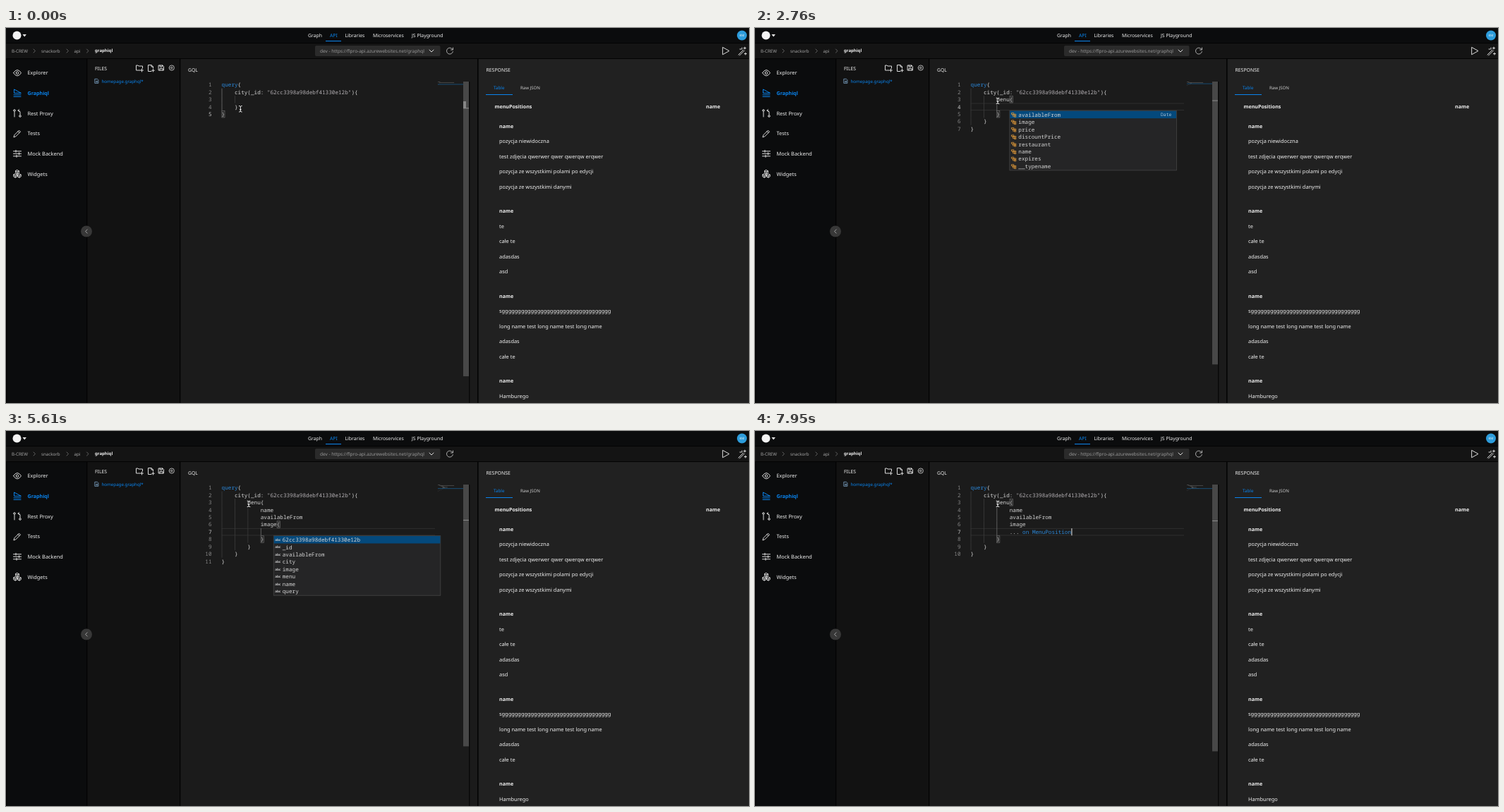
An HTML page for the animation above (8 s loop, 1053 px wide and 532 px high).

```html
<!DOCTYPE html>
<html lang="en">
<head>
<meta charset="utf-8">
<style>
  html, body { margin: 0; width: 100%; height: 100%; overflow: hidden; background: #0b0c0d; }
  svg { display: block; width: 1053px; height: 532px; }
  text { font-family: "Noto Sans", sans-serif; fill: #f0f0f0; text-rendering: geometricPrecision; white-space: pre; }
  .code { font-family: "Noto Sans Mono", monospace; font-size: 7.675px; fill: #d4d4d4; }
  .icon { fill: none; stroke: #dcdcdc; stroke-width: 1; stroke-linecap: round; stroke-linejoin: round; }
</style>
</head>
<body>
<svg viewBox="0 0 1053 532"><g id="app"></g><g id="editor"></g></svg>
<script>
const LOOP = 8000, BLINK = 150;
const LEFT = 305.6, TOP = 75.2, CHAR = 4.605, LINE = 10.45, VIEW = 456.4;
const BLUE = '#0a84ee', KEYWORD = '#2b87d8';

const rect = (x, y, w, h, fill, extra = '') =>
  `<rect x="${x}" y="${y}" width="${w}" height="${h}" fill="${fill}" ${extra}/>`;
const label = (x, y, str, size = 7.4, style = '') =>
  `<text x="${x}" y="${y}" dy=".36em" style="font-size:${size}px;${style}">${str}</text>`;
const icon = (x, y, d, style = '') =>
  `<path class="icon" transform="translate(${x} ${y})" d="${d}" style="${style}"/>`;
const code = (x, y, str, style = '') =>
  `<text class="code" x="${x}" y="${y}" dy=".36em" style="${style}">${str}</text>`;

// ---------- static interface ----------
function drawApp() {
  const bold = 'font-weight:700;', medium = 'font-weight:500;', blue = `fill:${BLUE};`;
  let s = rect(0, 0, 1053, 532, '#0b0c0d') + rect(0, 22, 1053, 21, '#141414') +
    rect(115, 44, 131, 488, '#121212') + rect(247, 44, 421, 488, '#1b1b1b') +
    rect(669.5, 44, 383.5, 488, '#212121') + rect(0, 21, 1053, 1, '#030303') + rect(0, 43, 1053, 1, '#030303');
  for (const x of [0, 114, 246, 668]) s += rect(x, 44, 1.3, 488, '#030303');

  s += '<circle cx="15.5" cy="10.5" r="6" fill="#f4f4f4"/><path d="M23.5 9h5.4l-2.7 3.4z" fill="#eee"/>';
  [['Graph', 428], ['API', 459], ['Libraries', 480.5], ['Microservices', 520], ['JS Playground', 575]]
    .forEach(([name, x], i) => s += label(x, 10.7, name, 6.85, medium + (i === 1 ? blue : '')));
  s += rect(453, 18, 22, 1, BLUE);
  s += '<circle cx="1043" cy="10.5" r="7" fill="#2d9cdb"/>' + label(1043, 10.7, 'KM', 4.5, 'text-anchor:middle');

  const crumb = 'fill:#a5a5a5;';
  s += label(8, 32.3, 'B-CREW', 6.2, crumb) + label(50, 32.3, 'snackorb', 6.2, crumb) +
    label(96.5, 32.3, 'api', 6.2, crumb) + label(126, 32.3, 'graphiql', 6, bold);
  for (const x of [40, 87, 115.5]) s += icon(x, 32.5, 'M-1-2.5L1.5 0-1 2.5', 'stroke:#777;stroke-width:.8');
  s += rect(438, 25, 177.5, 15, '#2b2b2b', 'rx="2"') +
    label(445, 32.7, 'dev - https://flpro-api.azurewebsites.net/graphql', 6.5, 'fill:#9a9a9a') +
    icon(603, 32.5, 'M-3-1.5L0 1.5 3-1.5') +
    icon(629, 32.5, 'M4-2A4.5 4.5 0 1 0 4.4 1M4.5-4.5V-1.5H1.5', 'stroke:#aaa') +
    icon(1020, 32.5, 'M-4-5L5 0-4 5z') +
    icon(1043, 33, 'M-5 5L2-2M-3.5 6L3.5-1M0-5V-3M-3-3H-1M4-6V-3M2.5-4.5H5.5M5 2V5M3.5 3.5H6.5');

  const cube = 'm0-2.6l2.4 1.3v2.6l-2.4 1.3-2.4-1.3v-2.6zm-2.4 1.3l2.4 1.3 2.4-1.3m-2.4 1.3v2.6';
  const items = [
    ['Explorer', 'M-5.5 0Q0-8.5 5.5 0Q0 8.5-5.5 0M-1.8 0a1.8 1.8 0 1 0 3.6 0a1.8 1.8 0 1 0-3.6 0'],
    ['Graphiql', 'M-4.5-5V0L5 0zM-5 2.5H5M-5 5H5'],
    ['Rest Proxy', 'M-4-2V5M4 2V-2Q4-4 1-4M2.5-5.5L1-4 2.5-2.5M-5.3-4a1.3 1.3 0 1 0 2.6 0a1.3 1.3 0 1 0-2.6 0M2.7 4a1.3 1.3 0 1 0 2.6 0a1.3 1.3 0 1 0-2.6 0'],
    ['Tests', 'M-5 5L-4 2 2.5-4.5 4.5-2.5-2 4zM1-3L3-1'],
    ['Mock Backend', 'M-5.5-3.5H5.5M-5.5 0H5.5M-5.5 3.5H5.5M-2-5V-2M2.5-1.5V1.5M-1 2V5'],
    ['Widgets', `M0-2.8${cube}M-2.8 2.6${cube}M2.8 2.6${cube}`],
  ];
  items.forEach(([name, d], i) => {
    const y = 63.7 + 28.65 * i, on = i === 1;
    s += icon(16, y, d, on ? `stroke:${BLUE}` : '') + label(30.5, y, name, on ? 7.1 : 7.4, on ? bold + blue : '');
  });
  s += '<circle cx="114" cy="288.5" r="8" fill="#383838"/>' + icon(114, 288.5, 'M1.2-2.6L-1.4 0 1.2 2.6', 'stroke:#bbb;stroke-width:.8');

  s += label(126, 57.2, 'FILES', 6.9, medium) + label(258, 59.5, 'GQL', 6.8, medium) + label(680.5, 59.5, 'RESPONSE', 6.9, medium);
  s += icon(189, 57, 'M1 3H-4.5V-4H-2L-1-3H4.5V0M3.5 1V5M1.5 3H5.5') +
    icon(205, 57, 'M1 4.5H-3.5V-4.5H1L3.5-2V0M1-4.5V-2H3.5M3.5 1.5V5M1.7 3.2H5.3') +
    icon(220, 56.5, 'M-3.5-3.5H2L3.5-2V3.5H-3.5zM-1.8-3.5V-1.5H1.5V-3.5M-2 3.5V.8H2V3.5') +
    icon(234.8, 56.5, 'M-3.6 0a3.6 3.6 0 1 0 7.2 0a3.6 3.6 0 1 0-7.2 0M-1.3 0a1.3 1.3 0 1 0 2.6 0a1.3 1.3 0 1 0-2.6 0', 'stroke-width:.8');
  s += icon(128.5, 75.3, 'M-2.3-3H1L2.4-1.6V3H-2.3zM-1 0H1.2M-1 1.5H1.2', 'stroke:#7fa8cc;stroke-width:.8') +
    label(135.5, 75.3, 'homepage.graphql*', 6.2, blue);

  s += label(691, 84.7, 'Table', 6.25, blue) + label(729, 84.7, 'Raw JSON', 6.1, 'fill:#ccc') + rect(680, 94, 38, 1, BLUE);
  s += label(692.5, 111.3, 'menuPositions', 7.1, bold) + label(992, 111.3, 'name', 7.1, bold);
  const groups = [
    ['pozycja niewidoczna', 'test zdjęcia qwerwer qwer qwerqw erqwer', 'pozycja ze wszystkimi polami po edycji', 'pozycja ze wszystkimi danymi'],
    ['te', 'całe te', 'adasdas', 'asd'],
    ['s' + 'g'.repeat(34), 'long name test long name test long name', 'adasdas', 'całe te'],
    ['Hamburego'],
  ];
  groups.forEach((names, g) => {
    const y = 139.3 + 120.45 * g;
    s += label(699, y, 'name', 7.1, bold);
    names.forEach((name, i) => s += label(699, y + 21.45 * (i + 1), name, 7.42));
  });
  return s;
}

// ---------- editing session ----------
const IN = n => ' '.repeat(4 * n);
const doc = body => `query{\n${IN(1)}city(_id: "62cc3398a98debf41330e12b"){\n${body}\n${IN(1)}}\n}`;
const city = str => doc(IN(2) + str);
const menu = (...lines) => doc([IN(2) + 'menu{', ...lines.map(l => IN(3) + l), IN(2) + '}'].join('\n'));
const dish = (...lines) => menu('name', 'availableFrom', ...lines);

const cityFields = ['_id', 'name', 'menu', 'restaurants', '__typename'];
const fields = ['availableFrom', 'image', 'price', 'discountPrice', 'restaurant', 'name', 'expires', '__typename'];
const words = ['62cc3398a98debf41330e12b', '_id', 'availableFrom', 'city', 'image', 'menu', 'name', 'query'];
const types = ['MenuItem', 'MenuPosition', 'Named', 'Priced'];
const details = { availableFrom: 'Date', _id: 'String', name: 'String', image: 'String', menu: 'Menu' };

// time, text with | as the caret, suggestions, selected row
const steps = [
  [0, city('')], [450, city('|')], [570, city('|'), cityFields, 0],
  [960, city('|'), cityFields, 1], [1200, city('|'), cityFields, 2],
  [1830, city('menu|')], [2040, city('menu{|}')], [2220, menu('|')],
  [2670, menu('|'), fields, 0], [2790, menu('n|'), ['name', '__typename', 'restaurant'], 0],
  [2880, menu('na|'), ['name', '__typename'], 0], [3030, menu('name|')],
  [3240, menu('name', '|')], [3330, menu('name', '|'), fields, 0], [3720, menu('name', 'availableFrom|')],
  [3990, menu('name', 'availableFrom{|}')], [4200, menu('name', 'availableFrom{', IN(1) + '|', '}')],
  [4440, menu('name', 'availableFrom{', '|')], [4590, dish('|')],
  [4830, dish('|'), fields, 0], [5040, dish('|'), fields, 1],
  [5130, dish('image|')], [5280, dish('image{|}')],
  [5430, dish('image{', IN(1) + '|', '}'), words, 0], [5760, dish('image{', IN(1) + '|', '}')],
  [5910, dish('image{', '|')], [6000, dish('image|')],
  [6120, dish('image', '|')], [6270, dish('image', '|'), fields, 0],
  [6510, dish('image', '.|')], [6600, dish('image', '..|')], [6780, dish('image', '...|')],
  [6840, dish('image', '... |')], [6900, dish('image', '... o|')], [6960, dish('image', '... on|')],
  [7200, dish('image', '... on |')], [7380, dish('image', '... on |'), types, 0],
  [7680, dish('image', '... on |'), types, 1], [7950, dish('image', '... on MenuPosition|')],
].map(([time, text, list, selected]) => ({ time, text, list, selected }));
steps.forEach((s, i) => s.edited = i && steps[i - 1].text === s.text ? steps[i - 1].edited : s.time);

const colX = col => LEFT + CHAR * col;
const lineY = row => TOP + LINE * row;

// The innermost pair of braces around the caret
function enclosingPair(text, caret) {
  const open = [];
  for (let i = 0; i < text.length; i++) {
    if (text[i] === '{') open.push(i);
    if (text[i] === '}') {
      const start = open.pop();
      if (start < caret && caret <= i + 1) return [start, i];
    }
  }
  return [];
}

const colorize = line => line.replace(/"[^"]*"|\bquery\b|\bon( MenuPosition)?\b/g, token =>
  `<tspan fill="${token[0] === '"' ? '#b2aeb2' : KEYWORD}">${token}</tspan>`);

function drawPopup({ list, selected }, x, y) {
  const h = list.length * LINE;
  let s = rect(x, y + .3, 236.5, h + 1, '#252526', 'stroke="#454545" stroke-width=".8"');
  s += rect(x + .4, y + .7 + selected * LINE, 235.7, LINE, '#04497c');
  list.forEach((item, i) => {
    const cy = y + .8 + LINE * (i + .5);
    s += list === words
      ? label(x + 2, cy, 'abc', 4.6, 'font-weight:700;fill:#ccc')
      : icon(x + 6, cy, 'M-3-2.5H0V-.5H-3zM-1.5-.5V2.2H1M1-.8H3V.8H1zM1 1.6H3V3.2H1zM-1.5 0H1', 'stroke:#e09a3a;stroke-width:.8');
    s += code(x + 12.5, cy, item);
    if (i === selected && details[item])
      s += code(x + 229.5, cy, details[item], 'font-size:6.4px;text-anchor:end;fill:#a9c3d8');
  });
  return s;
}

function drawEditor(t) {
  const step = steps.findLast(s => s.time <= t);
  const mark = step.text.indexOf('|'), focused = mark >= 0;
  const text = step.text.replace('|', ''), caret = focused ? mark : text.length;
  const lines = text.split('\n');
  const place = i => {
    const before = text.slice(0, i).split('\n');
    return { row: before.length - 1, col: before.at(-1).length };
  };
  const { row, col } = place(caret);
  const pair = enclosingPair(text, caret).map(place);
  let s = '';

  if (focused) for (const y of [lineY(row), lineY(row + 1) - .9]) s += rect(LEFT, y, 302.5, .9, '#303030');

  lines.forEach((line, i) => {
    const indent = line.match(/^ */)[0].length;
    for (let c = 0; c < indent; c += 4) {
      const active = pair.length && i > pair[0].row && i < pair[1].row && c === lines[pair[0].row].search(/\S/);
      s += rect(colX(c), lineY(i), .8, LINE, active ? '#707070' : '#3c3c3c');
    }
    const y = lineY(i + .5);
    s += code(291.5, y, i + 1, `text-anchor:end;fill:${i === row ? '#c6c6c6' : '#858585'}`);
    s += code(LEFT, y, colorize(line));
    // minimap
    s += rect(612 + .55 * indent, 76.1 + .87 * i, .55 * line.trim().length, .6, '#8a8a8a', 'opacity=".65"');
  });
  for (const p of focused ? pair : pair.slice(1))
    s += rect(colX(p.col) + .2, lineY(p.row) + .4, CHAR - .4, LINE - .9, '#88888818', 'stroke="#777" stroke-width=".6"');
  s += rect(612, 76 + .87 * row, 36, .9, '#17517c');

  // scrollbar and caret position in the ruler
  const scale = VIEW / (VIEW + (lines.length - 1) * LINE);
  const rulerY = 76 + row * LINE * scale;
  s += rect(656, 76, 1.4, 456, '#080808') + rect(648, 76, 8, VIEW * scale, '#484848');
  if (!focused) s += rect(648, 104, 4, 10, '#858585');
  s += rect(648, rulerY - 1, 8, 1, '#8c8c8c');

  if (focused && Math.floor((t - step.edited) / BLINK) % 2 === 0)
    s += rect(colX(col), lineY(row) + .2, 1.1, LINE - .3, '#d8d8d8');
  if (step.list) {
    const typed = lines[row].slice(0, col).match(/\w*$/)[0].length;
    s += drawPopup(step, colX(col - typed), lineY(row + 1));
  }

  // I-beam pointer
  const k = Math.min(1, Math.max(0, (t - 120) / 270)), ease = k * k * (3 - 2 * k);
  const beam = 'M-2-4.3Q0-4.3 0-3.3Q0-4.3 2-4.3M0-3.3V3.3M-2 4.3Q0 4.3 0 3.3Q0 4.3 2 4.3M-1 1H1';
  const px = 332.3 + 11.7 * ease, py = 114.8 - 11.4 * ease;
  return s + icon(px, py, beam, 'stroke:#000;stroke-width:2') + icon(px, py, beam, 'stroke:#fff');
}

document.getElementById('app').innerHTML = drawApp();
const editor = document.getElementById('editor');
let shown = '';
function frame() {
  const next = drawEditor(performance.now() % LOOP);
  if (next !== shown) editor.innerHTML = shown = next;
  requestAnimationFrame(frame);
}
frame();
</script>
</body>
</html>
```
